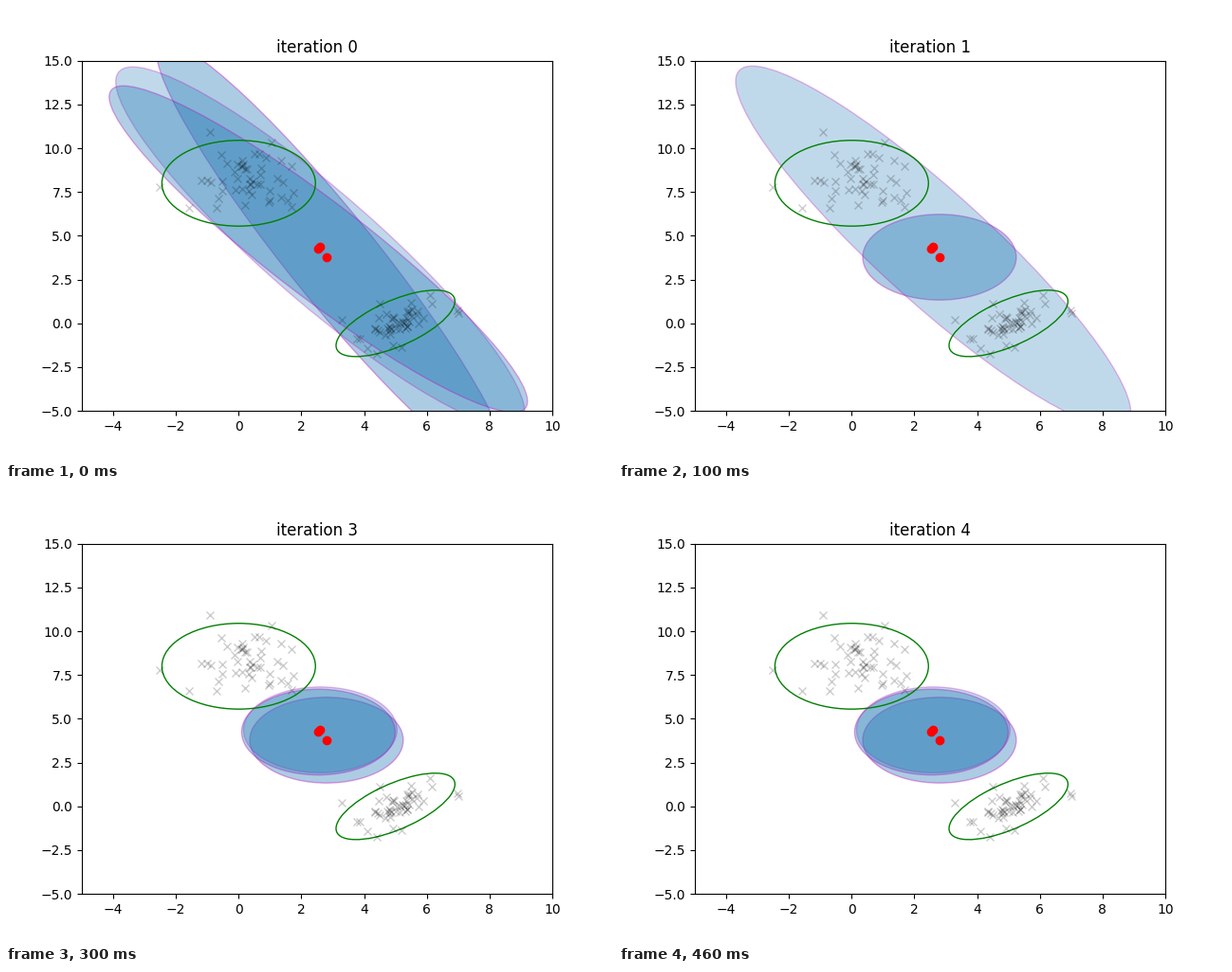
A matplotlib script that plays this animation: 640 by 480 pixels, repeating every 0.5 s.

```python
import numpy as np
import matplotlib.pyplot as plt
from matplotlib.animation import FuncAnimation
from matplotlib.patches import Ellipse

STEPS = 5
R95 = 2.4477  # radius holding 95% of a unit normal

MEANS = [(2.80, 3.78), (2.60, 4.37), (2.54, 4.24)]
WEIGHTS = [.37, .28, .35]

# Shapes are half width, half height and correlation
ROUND = (R95, R95, 0)
TILTED = (R95 * .6**.5, R95 * .6**.5, 2 / 3)
WIDE = (6.30, 10.32, -.915)
START = [(5.60, 12.3, -.948), (6.52, 10.27, -.917), (6.67, 9.32, -.932)]
START_MEANS = [(2.98, 3.78)] + MEANS[1:]


def make_points():
    """Two random clusters, each with a few fixed outliers."""
    rng = np.random.RandomState(7)
    x = rng.normal(.35, .6, 41)
    upper = np.column_stack([x, rng.uniform(6.6, 9.8, x.size)])
    x = rng.normal(5.1, .55, 40)
    lower = np.column_stack([x, rng.normal(.1 + .5 * (x - 5.1), .33)])
    upper_rim = [(-.92, 10.92), (1.05, 10.32), (-2.52, 7.78), (-1.58, 6.59),
                 (1.68, 6.65), (1.75, 7.46), (1.69, 8.95), (-1.18, 8.16)]
    lower_rim = [(6.98, .75), (7.01, .58), (3.29, .21), (4.50, 1.13),
                 (6.10, 1.61), (4.10, -1.42), (4.41, -1.74), (4.92, -1.26),
                 (5.19, -1.36), (3.86, -.88)]
    return np.vstack([upper, upper_rim, lower, lower_rim])


def ellipse(center, shape, **style):
    rx, ry, rho = shape
    cov = [[rx**2, rho * rx * ry], [rho * rx * ry, ry**2]]
    sizes, axes = np.linalg.eigh(cov)
    angle = np.degrees(np.arctan2(axes[1, 1], axes[0, 1]))
    return Ellipse(center, 2 * sizes[1]**.5, 2 * sizes[0]**.5,
                   angle=angle, **style)


def components(step):
    """Components start wide, then turn round one after another."""
    if step == 0:
        return zip(START_MEANS, START, WEIGHTS)
    shapes = [ROUND] * min(step, len(MEANS)) + [WIDE]
    return zip(MEANS, shapes, WEIGHTS)


fig, ax = plt.subplots(figsize=(6.4, 4.8), dpi=100)
points = make_points()


def draw(step):
    ax.clear()
    for mean, shape, weight in components(step):
        ax.add_patch(ellipse(mean, shape, fc="tab:blue", ec="m",
                             alpha=weight))
    for center, shape in [((0, 8), ROUND), ((5, 0), TILTED)]:
        ax.add_patch(ellipse(center, shape, fill=False, ec="green", lw=1))
    ax.plot(*points.T, "kx", alpha=.2)
    ax.plot(*np.transpose(MEANS), "ro")
    ax.set_xlim(-5, 10)
    ax.set_ylim(-5, 15)
    ax.set_title(f"iteration {step}")


anim = FuncAnimation(fig, draw, frames=STEPS, interval=100,
                     repeat=True, repeat_delay=0)
plt.show()
```
